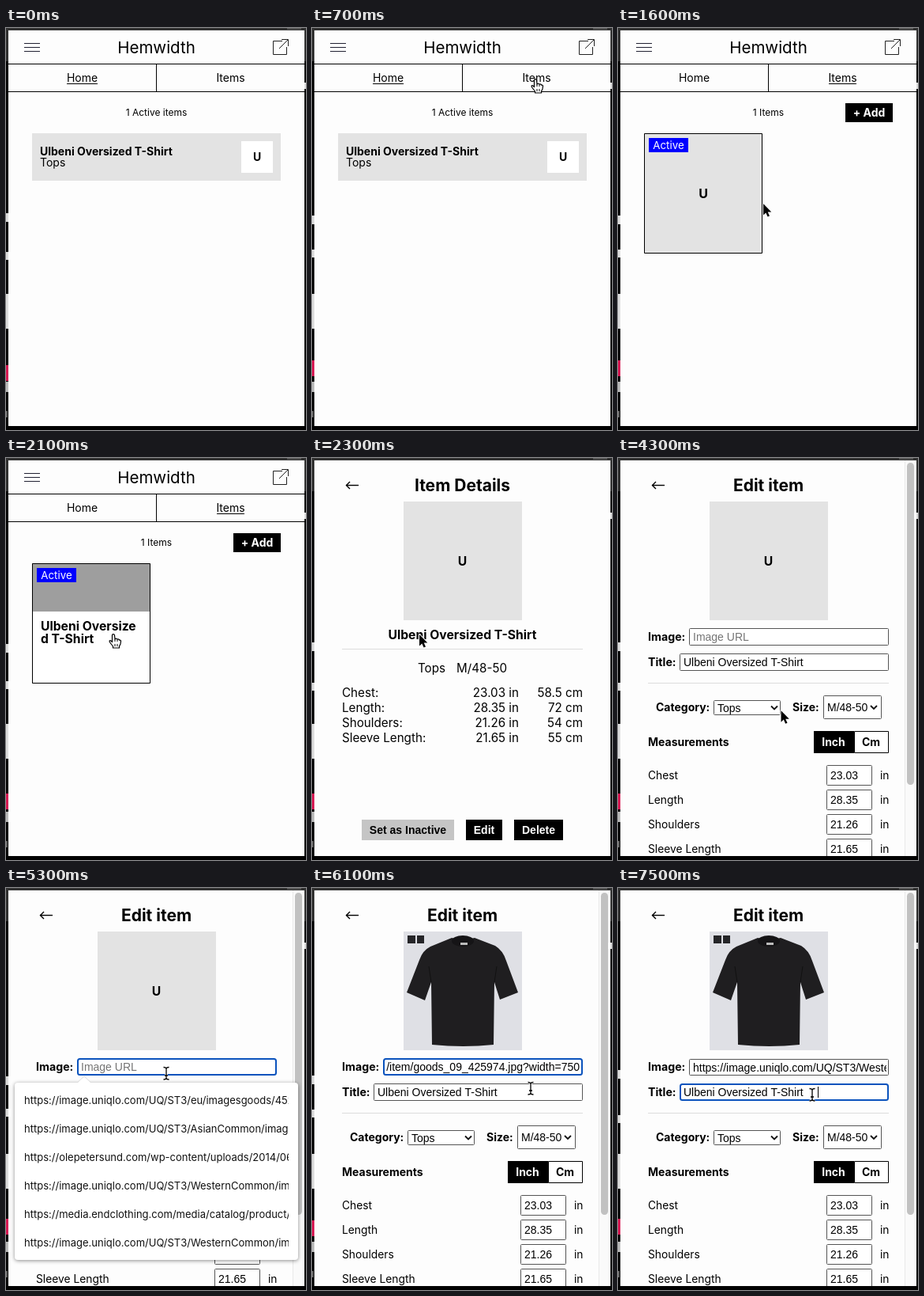
An HTML page with a canvas that plays this animation: 380x508 px, repeating every 8000 ms.

```html
<!DOCTYPE html>
<html lang="en">
<head>
<meta charset="utf-8">
<title>Wardrobe sizes</title>
<style>
html, body { margin: 0; width: 100%; height: 100%; overflow: hidden; background: #000; }
canvas { display: block; }
</style>
</head>
<body>
<canvas id="stage" width="380" height="508"></canvas>
<script>
const ctx = document.getElementById('stage').getContext('2d');
const LOOP = 8000, STEP = 100;
const UI = 'Inter, sans-serif', FORM = '"Liberation Sans", Arial, sans-serif';
const PAPER = '#fdfdfd', GREY = '#e3e3e3', BLUE = '#0b53bd';
const BRAND = 'Ulbeni', ITEM = BRAND + ' Oversized T-Shirt';

const HAND = new Path2D('M-1.5 1C-1.5-.8 1.3-.8 1.5 1L2 6C3 4.8 4.8 5 5 6.4 6 5.6 7.5 6 7.6 7.2 8.6 6.8 9.6 7.4 9.5 8.6L9 12 7.5 15V17H-.5V15L-4 10.5C-6 8-4.5 6.8-3 8L-1.5 9.5Z');
const ARROW = new Path2D('M0 0V14.5L3.3 11.4 5.6 16.6 8 15.6 5.7 10.6H10.3Z');
const BEAM = new Path2D('M-3.5-7.5Q0-7.5 0-5.5Q0-7.5 3.5-7.5M0-5.5V6M-3.5 8Q0 8 0 6Q0 8 3.5 8M-2 3H2');
const SHIRT = new Path2D('M177 63Q190 67 206 63L232 73Q242 79 246 92L261 132 238 141 231 119 230 198Q192 202 152 198L151 119 143 142 120 132 136 91Q140 79 150 74Z');

// Pointer path: time, x, y
const POINTER = [
  [400, 174, 312], [700, 283, 65], [1300, 283, 65], [1600, 184, 222], [1900, 140, 223],
  [2100, 136, 223], [2700, 136, 223], [3100, 213, 476], [4000, 213, 476], [4500, 203, 234],
  [5700, 203, 234], [6100, 277, 253], [6400, 255, 285], [7200, 255, 285], [7500, 246, 261]
];

const SUGGESTIONS = [
  'image.uniqlo.com/UQ/ST3/eu/imagesgoods/452',
  'image.uniqlo.com/UQ/ST3/AsianCommon/imagesgoods',
  'olepetersund.com/wp-content/uploads/2014/06/',
  'image.uniqlo.com/UQ/ST3/WesternCommon/imagesgoods',
  'media.endclothing.com/media/catalog/product/1',
  'image.uniqlo.com/UQ/ST3/WesternCommon/imagesgoods'
];
const SIZES = [
  ['Chest', '23.03', '58.5'], ['Length', '28.35', '72'],
  ['Shoulders', '21.26', '54'], ['Sleeve Length', '21.65', '55']
];

const clamp = v => Math.max(0, Math.min(1, v));
const ease = v => v * v * (3 - 2 * v);

function rect(x, y, w, h, color) {
  ctx.fillStyle = color;
  ctx.fillRect(x, y, w, h);
}
function outline(x, y, w, h, color, radius = 0, width = 1) {
  ctx.beginPath();
  ctx.roundRect(x + width / 2, y + width / 2, w - width, h - width, radius);
  ctx.strokeStyle = color;
  ctx.lineWidth = width;
  ctx.stroke();
}
function line(points, color = '#000', width = 1) {
  ctx.beginPath();
  points.forEach(([x, y]) => ctx.lineTo(x, y));
  ctx.strokeStyle = color;
  ctx.lineWidth = width;
  ctx.stroke();
}
function text(str, x, y, size, { bold, align = 'left', color = '#000', font = UI } = {}) {
  ctx.font = `${bold ? 700 : 400} ${size}px ${font}`;
  ctx.textAlign = align;
  ctx.fillStyle = color;
  ctx.fillText(str, x, y);
}
function clipped(x, y, w, h, draw) {
  ctx.save();
  ctx.beginPath();
  ctx.rect(x, y, w, h);
  ctx.clip();
  draw();
  ctx.restore();
}

function drawBackdrop(t) {
  rect(0, 0, 380, 508, '#000');
  rect(0, 0, 380, 42, '#303030');
  rect(356, 0, 18, 2, '#555');
  rect(378, 69, 2, 8, '#ddd');
  const sway = Math.round(4 * Math.sin(t / 700));
  rect(0, 234 + sway, 3, 11, '#ddd');
  rect(0, 283 - sway, 3, 10, '#ddd');
  rect(0, 336, 3, 44, '#ddd');
  rect(0, 426 - 2 * Math.abs(sway), 3, 20, '#d81b55');
  rect(0, 447, 3, 13, '#bbb');
  rect(0, 484, 2, 8, '#666');
  rect(3, 3, 375, 500, PAPER);
}

function drawHeader(onItems) {
  for (const y of [19.5, 24.5, 29.5]) line([[23, y], [43, y]], '#222233');
  text('Hemwidth', 190.5, 32, 20.5, { align: 'center' });
  line([[350, 16.5], [338.5, 16.5], [338.5, 33.5], [355.5, 33.5], [355.5, 24]], '#222');
  line([[346, 26], [357, 15]], '#222');
  line([[349, 14.5], [357.5, 14.5], [357.5, 23]], '#222');
  rect(3, 45, 375, 1, '#000');
  rect(3, 80, 375, 1, '#000');
  rect(190, 45, 1, 35, '#000');
  text('Home', 96.5, 68, 14, { align: 'center' });
  text('Items', 284.5, 68, 14, { align: 'center' });
  if (onItems) rect(267, 70, 35, 1, '#000');
  else rect(77, 70, 39, 1, '#000');
}

function drawHome() {
  drawHeader(false);
  text('1 Active items', 190.5, 111, 12, { align: 'center' });
  rect(33, 133, 315, 60, GREY);
  text(ITEM, 43, 161, 14, { bold: true });
  text('Tops', 43, 175, 14);
  rect(298, 143, 40, 40, '#fff');
  text(BRAND[0], 318, 168, 14, { bold: true, align: 'center' });
}

function drawItems(t) {
  drawHeader(true);
  text('1 Items', 190.5, 111, 12, { align: 'center' });
  rect(288, 95, 60, 24, '#000');
  text('+ Add', 318, 112, 14, { bold: true, align: 'center', color: '#fff' });
  const hover = ease(clamp((t - 1600) / 400));
  const shade = Math.round(227 - 69 * hover);
  rect(33, 133, 150, 152, `rgb(${shade},${shade},${shade})`);
  text(BRAND[0], 108, 215, 16, { bold: true, align: 'center' });
  clipped(34, 134, 148, 150, () => {
    const top = 284 - 90 * hover;
    rect(34, top, 148, 91, '#fff');
    text(BRAND + ' Oversize', 44, top + 24, 15.7, { bold: true });
    text('d T-Shirt', 44, top + 40, 15.7, { bold: true });
  });
  outline(33, 133, 150, 152, '#000');
  rect(39, 139, 50, 18, '#0000ff');
  text('Active', 64, 153, 13.3, { align: 'center', color: '#fff' });
}

function drawTitle(label) {
  line([[59, 34.5], [43, 34.5]], '#000', 1.4);
  line([[48, 30], [43.5, 34.5], [48, 39]], '#000', 1.4);
  text(label, 190.5, 42, 21, { bold: true, align: 'center' });
}

function drawPicture(loaded) {
  rect(116, 55, 150, 150, loaded ? '#dfe0e5' : GREY);
  if (!loaded) {
    text(BRAND[0], 190.5, 136, 15.7, { bold: true, align: 'center' });
    return;
  }
  ctx.fillStyle = '#1f1e20';
  ctx.fill(SHIRT);
  ctx.beginPath();
  ctx.ellipse(191, 67, 14, 7, 0, 0, Math.PI * 2);
  ctx.fillStyle = '#151416';
  ctx.fill();
  line([[151, 119], [148, 99]], '#111', 1);
  line([[231, 119], [234, 99]], '#111', 1);
  rect(188, 69, 9, 3, '#bbb');
  rect(121, 60, 10, 10, '#252528');
  rect(133, 60, 9, 10, '#252528');
}

function drawButton(label, x, w, color, ink) {
  rect(x, 457, w, 26, color);
  text(label, x + w / 2, 475, 14, { bold: true, align: 'center', color: ink, font: FORM });
}

function drawDetails(t) {
  drawTitle('Item Details');
  drawPicture(false);
  text(ITEM, 190.5, 229, 15.7, { bold: true, align: 'center' });
  rect(38, 241, 305, 1, '#ddd');
  text('Tops', 134, 271, 15.2);
  text('M/48-50', 183, 271, 15.2);
  SIZES.forEach(([name, inch, cm], i) => {
    const y = 302 + 19 * i;
    text(name + ':', 38, y, 15.2);
    text(inch + ' in', 262, y, 15.2, { align: 'right' });
    text(cm + ' cm', 343, y, 15.2, { align: 'right' });
  });
  drawButton('Set as Inactive', 63, 117, '#c5c5c5', '#000');
  drawButton('Edit', 195, 46, t >= 3100 ? '#292929' : '#000', '#fff');
  drawButton('Delete', 256, 62, '#000', '#fff');
}

function drawField(x, y, w, h, value, { focus, color = '#000', atEnd, caret } = {}) {
  ctx.beginPath();
  ctx.roundRect(x, y, w, h, 2);
  ctx.fillStyle = '#fff';
  ctx.fill();
  if (focus) outline(x, y, w, h, BLUE, 2.5, 2);
  else outline(x, y, w, h, '#555', 1);
  const baseline = y + h / 2 + 5;
  clipped(x + 3, y, w - 6, h, () => text(value, atEnd ? x + w - 4 : x + 5, baseline, 14,
    { font: FORM, color, align: atEnd ? 'right' : 'left' }));
  if (caret) {
    const end = atEnd ? x + w - 4 : x + 5 + ctx.measureText(value).width;
    rect(Math.round(end), y + 4, 1, h - 8, '#000');
  }
}

function drawSelect(x, y, w, h, value, arrowX) {
  drawField(x, y, w, h, value);
  const mid = y + h / 2;
  line([[arrowX - 4, mid - 2], [arrowX, mid + 2], [arrowX + 4, mid - 2]], '#111', 1.8);
}

function drawSuggestions() {
  ctx.save();
  ctx.shadowColor = 'rgba(0,0,0,.45)';
  ctx.shadowBlur = 5;
  ctx.shadowOffsetY = 1;
  ctx.beginPath();
  ctx.roundRect(11, 246, 359, 224, 4);
  ctx.fillStyle = '#fff';
  ctx.fill();
  ctx.restore();
  ctx.beginPath();
  ctx.moveTo(90, 247);
  ctx.lineTo(99, 238);
  ctx.lineTo(108, 247);
  ctx.fillStyle = '#fff';
  ctx.fill();
  line([[90, 246], [99, 238], [108, 246]], '#ddd');
  clipped(11, 246, 347, 224, () =>
    SUGGESTIONS.forEach((url, i) => text('https://' + url, 23, 273 + 36 * i, 13, { color: '#111' })));
}

function drawImageField(t) {
  const box = [90, 215, 253, 22];
  if (t < 5400) {
    const focus = t >= 4600;
    drawField(...box, 'Image URL', { focus, color: '#757575' });
  } else if (t < 6800) {
    const caret = Math.floor((t - 5400) / 500) % 2 === 0;
    drawField(...box, '/item/goods_09_425974.jpg?width=750', { focus: true, atEnd: true, caret });
  } else {
    drawField(90, 216, 253, 21, 'https://image.uniqlo.com/UQ/ST3/WesternCommon');
  }
}

function drawEdit(t) {
  drawTitle('Edit item');
  drawPicture(t >= 5500);
  text('Image:', 38, 231, 14.2, { bold: true });
  drawImageField(t);
  text('Title:', 38, 263, 14.2, { bold: true });
  const editing = t >= 7500;
  drawField(78, 247, 265, 22, ITEM, { focus: editing, caret: editing });
  rect(38, 284, 305, 1, '#ddd');
  text('Category:', 48, 320, 14, { bold: true });
  drawSelect(121, 306, 85, 19, 'Tops', 198);
  text('Size:', 221, 320, 14, { bold: true });
  drawSelect(260, 300, 74, 30, 'M/48-50', 324);
  text('Measurements', 38, 364, 14, { bold: true });
  rect(248, 345, 51, 28, '#000');
  text('Inch', 273, 364, 14, { bold: true, align: 'center', color: '#fff' });
  rect(299, 345, 44, 28, '#fff');
  outline(299, 345, 44, 28, '#000');
  text('Cm', 320.5, 364, 14, { bold: true, align: 'center' });
  SIZES.forEach(([name, inch], i) => {
    const y = 401 + 31 * i;
    text(name, 38, y + 5, 13.8);
    drawField(264, y - 13, 58, 26, inch);
    text('in', 332, y + 5, 13.8);
  });
  rect(363, 3, 15, 500, '#fafafa');
  rect(363, 3, 1, 500, '#e8e8e8');
  ctx.beginPath();
  ctx.roundRect(366, 6, 9, 407, 4.5);
  ctx.fillStyle = '#c1c1c1';
  ctx.fill();
  if (t >= 4700 && t < 5400) drawSuggestions();
}

function pointerAt(t) {
  const next = POINTER.findIndex(p => p[0] > t);
  if (next < 0) return POINTER[POINTER.length - 1].slice(1);
  const [t0, x0, y0] = POINTER[next - 1], [t1, x1, y1] = POINTER[next];
  const k = ease((t - t0) / (t1 - t0));
  return [x0 + (x1 - x0) * k, y0 + (y1 - y0) * k];
}

function pointerShape(t, x, y) {
  const inside = (l, top, r, b) => x >= l && x < r && y >= top && y < b;
  if (t < 2200) {
    const link = inside(190, 46, 378, 80) || (t >= 1000 && inside(33, 133, 183, 285));
    return link ? 'hand' : 'arrow';
  }
  if (t < 3700) return inside(195, 457, 241, 483) ? 'hand' : 'arrow';
  return inside(90, 215, 343, 238) || inside(78, 247, 343, 270) ? 'beam' : 'arrow';
}

function drawPointer(t) {
  if (t < 400) return;
  const [x, y] = pointerAt(t), shape = pointerShape(t, x, y);
  ctx.save();
  ctx.translate(x, y);
  ctx.lineJoin = 'round';
  if (shape === 'beam') {
    ctx.strokeStyle = '#fff';
    ctx.lineWidth = 3;
    ctx.stroke(BEAM);
    ctx.strokeStyle = '#000';
    ctx.lineWidth = 1.3;
    ctx.stroke(BEAM);
  } else if (shape === 'hand') {
    ctx.fillStyle = '#fff';
    ctx.fill(HAND);
    ctx.strokeStyle = '#000';
    ctx.lineWidth = 1.2;
    ctx.stroke(HAND);
    line([[2, 6], [2, 9]]);
    line([[5, 7], [5, 9]]);
    line([[2, 12], [2, 15]]);
    line([[5, 12], [5, 15]]);
  } else {
    ctx.strokeStyle = '#fff';
    ctx.lineWidth = 2;
    ctx.stroke(ARROW);
    ctx.fillStyle = '#000';
    ctx.fill(ARROW);
  }
  ctx.restore();
}

function render() {
  const t = Math.floor((performance.now() % LOOP) / STEP) * STEP;
  drawBackdrop(t);
  clipped(3, 3, 375, 500, () => {
    if (t < 1000) drawHome();
    else if (t < 2200) drawItems(t);
    else if (t < 3700) drawDetails(t);
    else drawEdit(t);
    drawPointer(t);
  });
  requestAnimationFrame(render);
}
requestAnimationFrame(render);
</script>
</body>
</html>
```
